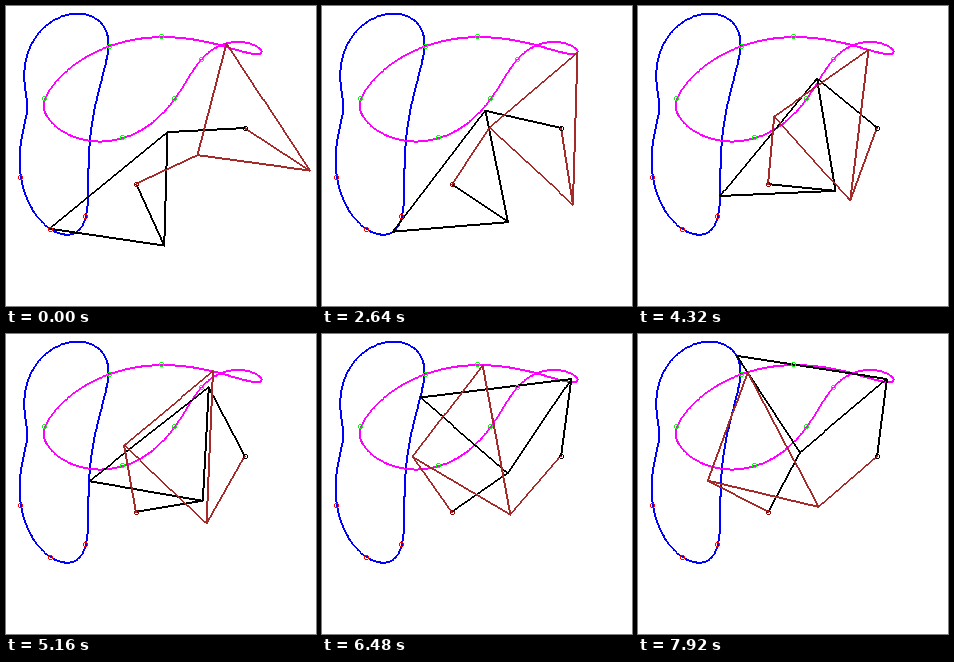
Animation, 310 px wide and 300 px high, one loop 8 s. Source, as an HTML page with a canvas:

```html
<!DOCTYPE html>
<html lang="en">
<head>
<meta charset="utf-8">
<title>Two four-bar linkages</title>
<style>
html, body { margin: 0; width: 100%; height: 100%; overflow: hidden; background: #fff; }
canvas { display: block; }
</style>
</head>
<body>
<canvas id="stage" width="310" height="300"></canvas>
<script>
const ctx = document.getElementById('stage').getContext('2d');
const LOOP = 8000, STEP = 120, RAD = Math.PI / 180;

// One crank-rocker, assembled in its two mirror circuits
const A = [130, 178], B = [239, 122];
const CRANK = 67.8, COUPLER = 113.6, ROCKER = 77.6, ARM = 115.5, ARM_ANGLE = -83.2 * RAD;
const black = { color: '#000', trace: '#00f', lag: 0, side: -1 };
const brown = { color: '#a52a2a', trace: '#f0f', lag: -90.6, side: 1 };

const redMarks = [[14, 171], [44, 223], [79, 210]];
const greenMarks = [[103, 40], [155, 30], [195, 53], [168, 92], [116, 131], [38, 92]];

// Crank angle in degrees at key times in ms
const keys = [[0, 65.4], [840, 57.2], [1440, 49.4], [2640, 34.2],
  [4320, 5.8], [5160, -9.5], [6480, -35], [7920, -61.8]];

function slope(i) {
  const a = keys[Math.max(i - 1, 0)], b = keys[Math.min(i + 1, keys.length - 1)];
  return (b[1] - a[1]) / (b[0] - a[0]);
}

function crankAngle(t) {
  let i = 0;
  while (i < keys.length - 2 && t > keys[i + 1][0]) i++;
  const [t0, v0] = keys[i], [t1, v1] = keys[i + 1];
  const d = t1 - t0, u = (t - t0) / d, w = 1 - u;
  return v0 * w * w * (1 + 2 * u) + v1 * u * u * (3 - 2 * u)
    + d * u * w * (slope(i) * w - slope(i + 1) * u);
}

const polar = (p, len, angle) => [p[0] + len * Math.cos(angle), p[1] + len * Math.sin(angle)];

function solve(side, degrees) {
  const p = polar(A, CRANK, degrees * RAD);
  const dx = B[0] - p[0], dy = B[1] - p[1], dist = Math.hypot(dx, dy);
  const cos = (dist ** 2 + COUPLER ** 2 - ROCKER ** 2) / (2 * dist * COUPLER);
  const dir = Math.atan2(dy, dx) + side * Math.acos(Math.min(1, cos));
  return { p, q: polar(p, COUPLER, dir), tip: polar(p, ARM, dir + ARM_ANGLE) };
}

// Hard-edged line, two pixels thick
function line(a, b) {
  const dx = b[0] - a[0], dy = b[1] - a[1];
  const flat = Math.abs(dx) > Math.abs(dy);
  const n = Math.max(1, Math.ceil(Math.max(Math.abs(dx), Math.abs(dy))));
  for (let i = 0; i <= n; i++) {
    const x = a[0] + dx * i / n, y = a[1] + dy * i / n;
    if (flat) ctx.fillRect(Math.floor(x), Math.round(y) - 1, 1, 2);
    else ctx.fillRect(Math.round(x) - 1, Math.floor(y), 2, 1);
  }
}

function path(points, color) {
  ctx.fillStyle = color;
  for (let i = 1; i < points.length; i++) line(points[i - 1], points[i]);
}

function ring([x, y], color) {
  ctx.fillStyle = color;
  for (const d of [-2, 2]) {
    ctx.fillRect(x - 1, y + d, 3, 1);
    ctx.fillRect(x + d, y - 1, 1, 3);
  }
}

for (const k of [black, brown]) {
  k.curve = Array.from({ length: 181 }, (_, i) => solve(k.side, i * 2).tip);
}

function linkage(k, angle) {
  const { p, q, tip } = solve(k.side, angle + k.lag);
  path([A, p, q, B], k.color);
  path([p, tip, q], k.color);
}

function draw(t) {
  ctx.fillStyle = '#fff';
  ctx.fillRect(0, 0, 310, 300);
  path(black.curve, black.trace);
  path(brown.curve, brown.trace);
  const angle = crankAngle(t);
  linkage(black, angle);
  linkage(brown, angle);
  redMarks.forEach(p => ring(p, '#f00'));
  greenMarks.forEach(p => ring(p, '#0f0'));
  ring(A, '#900');
  ring(B, '#000');
}

function tick() {
  const t = performance.now() % LOOP;
  draw(Math.floor(t / STEP) * STEP);
  requestAnimationFrame(tick);
}
tick();
</script>
</body>
</html>
```
